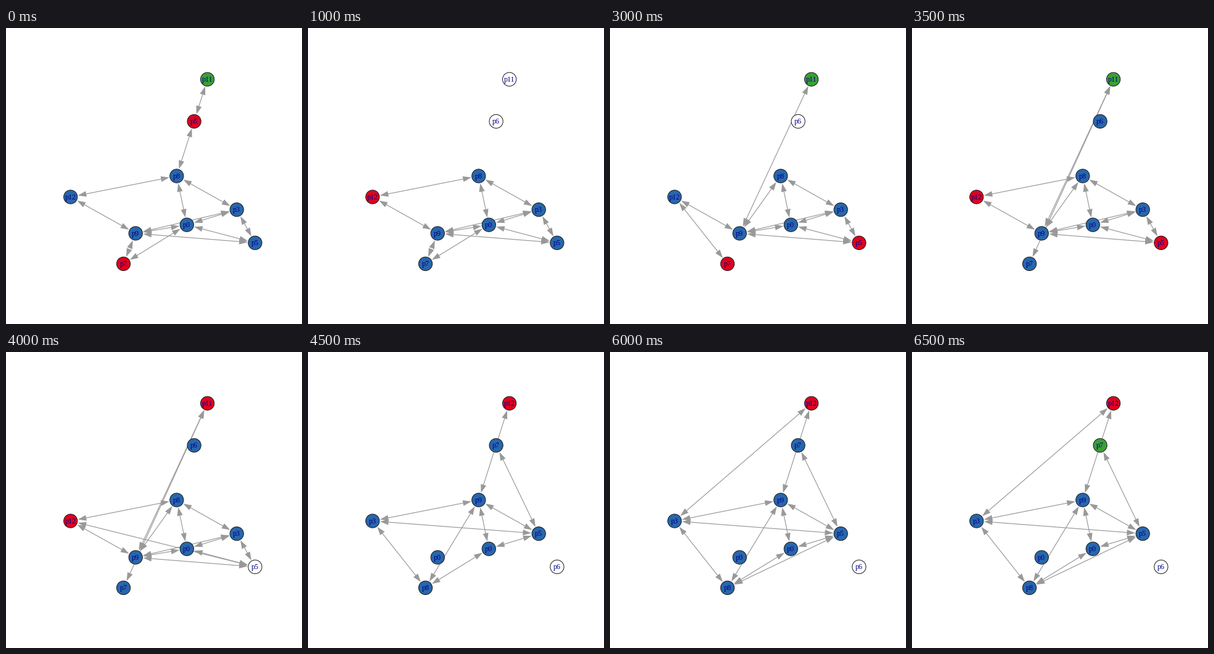
Recreate the animation shown at these times as a matplotlib script. Size 480 by 480 pixels, loop 7000 ms.

```python
import math
import matplotlib.pyplot as plt
from matplotlib.animation import FuncAnimation
from matplotlib.patches import Circle, Polygon

SIZE, DPI = 480, 80
PT = 72 / DPI          # points per pixel
RADIUS = 11.1
TIP, HEAD, HALF = 12.2, 13.6, 4.6
GREY, INK = "#999999", "#00008b"
FILL = {"b": "#2866ab", "r": "#de0320", "g": "#3a9f35", "w": "#ffffff"}

POS = {
    "A": (326.6, 83.2), "B": (305.1, 151.4), "C": (276.8, 240),
    "D": (104.7, 274), "E": (374.2, 294.6), "F": (293.3, 319.2),
    "G": (210.2, 333), "H": (403.9, 348.4), "I": (190.5, 382.4),
}
EARLY = dict(zip("ABCDEFGHI", "p11 p6 p8 p12 p3 p0 p9 p5 p7".split()))
LATE = dict(zip("ABCDEFGHI", "p12 p7 p9 p3 p5 p0 p0 p6 p8".split()))

CORE = "CE CF EG EF FG FH GH EH"
RING = CORE + " CD DG GI FI"
START = RING + " AB BC"
SHIFT = CORE + " CG DG GI FI"
DROP = CORE + " CG DG FI"
SWAP = CORE + " CG DG DI"
BACK = SWAP + " AG"
CROSS = CORE + " CG DG AG AI CD"
FULL = CROSS + " DH"
NEW = "AC BE CD CE CF CI DE DI EF FI"
LINKED = NEW + " AD"
LAST = LINKED + " EI"

# labels, colours of nodes A to I, two-way links
STEPS = [
    (EARLY, "grbbbbbbr", START),
    (EARLY, "rrbrbbbbb", START),
    (EARLY, "wwbrbbbbb", RING),
    (EARLY, "wwbrbbbbb", SHIFT),
    (EARLY, "wwbrbbbbb", DROP),
    (EARLY, "wwbrbbbbr", SWAP),
    (EARLY, "gwbbbbbrr", BACK),
    (EARLY, "gbbrbbbrb", CROSS),
    (EARLY, "rbbrbbbwb", FULL),
    (LATE, "rbbbbbbwb", NEW),
    (LATE, "rbbbbbbwb", LINKED),
    (LATE, "rgbbbbbwb", LAST),
    (LATE, "rbbbbbbwb", LAST),
    (LATE, "rgbbbbbwb", LAST),
]

fig = plt.figure(figsize=(SIZE / DPI, SIZE / DPI), dpi=DPI, facecolor="white")
ax = fig.add_axes([0, 0, 1, 1])


def arrow_head(x, y, ux, uy):
    """Triangle pointing at a node; (ux, uy) leads away from the node."""
    tx, ty = x + ux * TIP, y + uy * TIP
    bx, by = tx + ux * HEAD, ty + uy * HEAD
    ax.add_patch(Polygon(
        [(tx, ty), (bx - uy * HALF, by + ux * HALF),
         (bx + uy * HALF, by - ux * HALF)],
        facecolor=GREY, edgecolor="none", zorder=1))


def link(a, b):
    (x0, y0), (x1, y1) = POS[a], POS[b]
    dist = math.hypot(x1 - x0, y1 - y0)
    ux, uy = (x1 - x0) / dist, (y1 - y0) / dist
    inset = TIP + HEAD - 0.5
    if dist - 2 * inset > 5:
        ax.plot([x0 + ux * inset, x1 - ux * inset],
                [y0 + uy * inset, y1 - uy * inset],
                color=GREY, lw=1.2 * PT, solid_capstyle="butt", zorder=1)
    arrow_head(x0, y0, ux, uy)
    arrow_head(x1, y1, -ux, -uy)


def node(name, label, colour):
    x, y = POS[name]
    ax.add_patch(Circle((x, y), RADIUS, facecolor=FILL[colour],
                        edgecolor="#1a1a1a", lw=1 * PT, zorder=2))
    ax.text(x, y + 3.8, label, ha="center", va="baseline", color=INK,
            family="Liberation Serif", fontsize=12 * PT, zorder=3)


def draw(i):
    ax.clear()
    ax.set_xlim(0, SIZE)
    ax.set_ylim(SIZE, 0)
    ax.axis("off")
    labels, colours, links = STEPS[i % len(STEPS)]
    for a, b in links.split():
        link(a, b)
    for name, colour in zip(POS, colours):
        node(name, labels[name], colour)
    return []


anim = FuncAnimation(fig, draw, frames=len(STEPS), interval=500,
                     init_func=lambda: [], repeat=True, repeat_delay=0)
plt.show()
```
